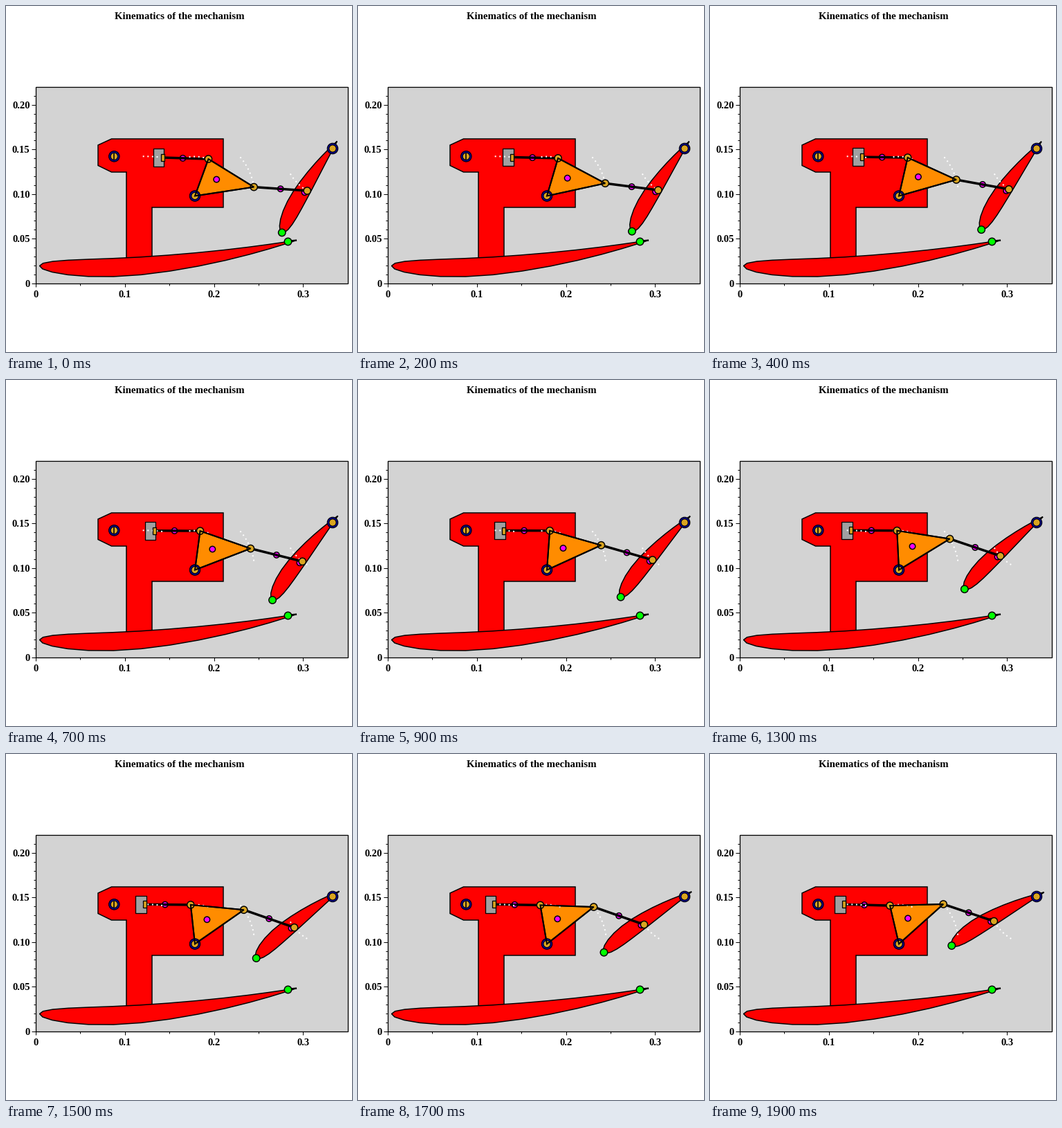
Write a matplotlib script that moves like this. It is 500 px wide and 500 px high and loops after 2000 ms.

```python
import numpy as np
import matplotlib.pyplot as plt
from matplotlib.animation import FuncAnimation
from matplotlib.patches import Circle, Polygon, Rectangle

FRAMES, INTERVAL = 20, 100
PX = 0.72  # points per pixel at 100 dpi
GOLD, NAVY, LIME, MAGENTA = "#daa520", "#000080", "#00ff00", "#ff00ff"
SCALE, X0, Y0 = 1288, 43, 400.5

CRANK = np.array([273.0, 274.5])
HINGE = np.array([472.0, 206.0])
R_B, R_C, SPREAD = 56.9, 86.2, np.radians(61.35)
LINK, ARM, CHORD, FLAP_LEN = 77.2, 71.2, 141.8, 154
STEP = 32.5 / (FRAMES - 1)


def polar(origin, r, angle):
    return origin + r * np.array([np.cos(angle), -np.sin(angle)])


def left_of(v):
    return np.array([v[1], -v[0]])


def airfoil(length, thick, camber, peak, n=14):
    """NACA four-digit outline with its nose at the origin, chord along x."""
    s = (1 - np.cos(np.linspace(0, np.pi, n + 1))) / 2
    half = 5 * thick * (0.2969 * np.sqrt(s) - 0.126 * s - 0.3516 * s ** 2
                        + 0.2843 * s ** 3 - 0.1036 * s ** 4)
    run = np.where(s < peak, peak, 1 - peak)
    mean = camber * (1 - ((s - peak) / run) ** 2)
    tilt = np.arctan(2 * camber * (peak - s) / run ** 2 / length)
    offset = half * np.array([-np.sin(tilt), np.cos(tilt)])
    middle = np.array([s * length, mean])
    return np.hstack([middle + offset, (middle - offset)[:, ::-1]]).T


def place(outline, nose, along, side):
    return nose + outline[:, :1] * along + outline[:, 1:] * side


def pose(k):
    shift = STEP * k
    pin = np.array([226 - shift, 217.3 + 1.7 * (1 - k / (FRAMES - 1)) ** 3])
    beta = np.arccos((19.5 - shift) / R_B)
    gamma = beta - SPREAD
    b, c = polar(CRANK, R_B, beta), polar(CRANK, R_C, gamma)
    # joint d closes the four-bar loop
    span = HINGE - c
    dist = np.hypot(*span)
    u = span / dist
    a = (LINK ** 2 - ARM ** 2 + dist ** 2) / (2 * dist)
    d = c + a * u - np.sqrt(LINK ** 2 - a ** 2) * left_of(u)
    along = (HINGE - d) / ARM
    side = left_of(along)
    rod = (pin - b) / np.hypot(*(pin - b))
    return dict(pin=pin, b=b, c=c, d=d, along=along, side=side,
                nose=HINGE - CHORD * along,
                rod_mass=b + 37 * rod, link_mass=(c + d) / 2,
                crank_mass=polar(CRANK, 39.3, gamma + np.radians(28.8)),
                flap_mass=HINGE - 75.1 * along + 1.9 * side)


fig = plt.figure(figsize=(5, 5), dpi=100, facecolor="white")
ax = fig.add_axes([0, 0, 1, 1])
ax.set_xlim(0, 500)
ax.set_ylim(500, 0)
ax.axis("off")


def shape(points, color, z, width=1.5):
    return ax.add_patch(Polygon(points, closed=True, fc=color, ec="black",
                                lw=width * PX, zorder=z))


def box(x, y, w, h, color, z):
    return ax.add_patch(Rectangle((x, y), w, h, fc=color, ec="black",
                                  lw=1.3 * PX, zorder=z))


def line(xs, ys, width, z, color="black", **kw):
    return ax.plot(xs, ys, color=color, lw=width * PX, zorder=z,
                   solid_capstyle="butt", **kw)[0]


def dot(at, r, color, z, width=1.5):
    return ax.add_patch(Circle(at, r, fc=color, ec="black",
                               lw=width * PX, zorder=z))


def pivot(at):
    dot(at, 7.8, NAVY, 9, 1)
    dot(at, 5, GOLD, 9.1, 0.9)


def label(x, y, text, size=14.6, ha="center"):
    ax.text(x, y, text, family="Liberation Serif", weight="bold",
            size=size * PX, ha=ha, va="baseline", zorder=1)


def draw_axes():
    box(X0, 117, 451, Y0 - 117, "#d3d3d3", 0)
    for i in range(7):
        x = X0 + 0.05 * i * SCALE
        line([x, x], [Y0, Y0 + (3 if i % 2 else 5.5)], 1, 1)
        if i % 2 == 0:
            label(x, 421, f"{i / 20:.1f}" if i else "0")
    for i in range(22):
        y = Y0 - 0.01 * i * SCALE
        line([X0, X0 - (3 if i % 5 else 6)], [y, y], 1, 1)
        if i % 5 == 0:
            label(34.5, y + 5, f"{i / 100:.2f}" if i else "0", ha="right")
    label(251, 18.7, "Kinematics of the mechanism", 14.9)


def draw_fixed():
    shape([(133, 201), (152.5, 192), (314, 192), (314, 291), (211, 291),
           (211, 366), (174, 366), (174, 240), (152.5, 240), (133, 230.5)],
          "red", 2)
    nose, tail = np.array([48.5, 375.5]), np.array([420, 338.5])
    length = np.hypot(*(tail - nose))
    along = (tail - nose) / length
    shape(place(airfoil(length, 26.3, 14.8, 0.44), nose, along,
                -left_of(along)), "red", 3)
    line(*zip(tail - 13 * along, tail), 2.2, 3.1)
    for at in ((156.3, 217.3), CRANK, HINGE):
        pivot(at)
    line([156.3, 156.3], [212.5, 222], 1.6, 9.2)
    dot((407.5, 340.5), 5.2, LIME, 9)


def draw_traces():
    path = [pose(k) for k in np.linspace(0, FRAMES - 1, 60)]
    for name in ("pin", "b", "c", "d"):
        line(*zip(*(p[name] for p in path)), 2, 8, "white",
             linestyle=(0, (1, 2.3)), dash_capstyle="butt")


draw_axes()
draw_fixed()
draw_traces()

flap_outline = airfoil(FLAP_LEN, 23, 5.5, 0.4)
flap = shape(flap_outline, "red", 4)
tail = line([], [], 1.8, 4.1)
crank = shape(np.zeros((3, 2)), "#ff8c00", 5, 2)
crank_edge = shape(np.zeros((3, 2)), "none", 10, 2)
slider = box(0, 0, 15.8, 25.6, "#a0a0a0", 5)
key = box(0, 0, 5, 10, GOLD, 9)
rod, link = line([], [], 3.5, 7), line([], [], 3.5, 7)
dots = {name + "_mass": dot((0, 0), 4.2, MAGENTA, 6)
        for name in ("rod", "link", "crank", "flap")}
dots.update({name: dot((0, 0), 5.1, GOLD, 9) for name in "bcd"})
dots["nose"] = dot((0, 0), 5.2, LIME, 9)


def update(k):
    p = pose(k)
    flap.set_xy(place(flap_outline, p["nose"], p["along"], p["side"]))
    tail.set_data(*zip(HINGE, p["nose"] + FLAP_LEN * p["along"]))
    for part in (crank, crank_edge):
        part.set_xy([CRANK, p["b"], p["c"]])
    slider.set_xy(p["pin"] - (13.4, 12.8))
    key.set_xy(p["pin"] - (2.5, 5))
    rod.set_data(*zip(p["pin"], p["b"]))
    link.set_data(*zip(p["c"], p["d"]))
    for name, mark in dots.items():
        mark.center = tuple(p[name])
    return [flap, tail, crank, crank_edge, slider, key, rod, link,
            *dots.values()]


anim = FuncAnimation(fig, update, frames=FRAMES, interval=INTERVAL,
                     repeat=True, repeat_delay=0, blit=False)
plt.show()
```
